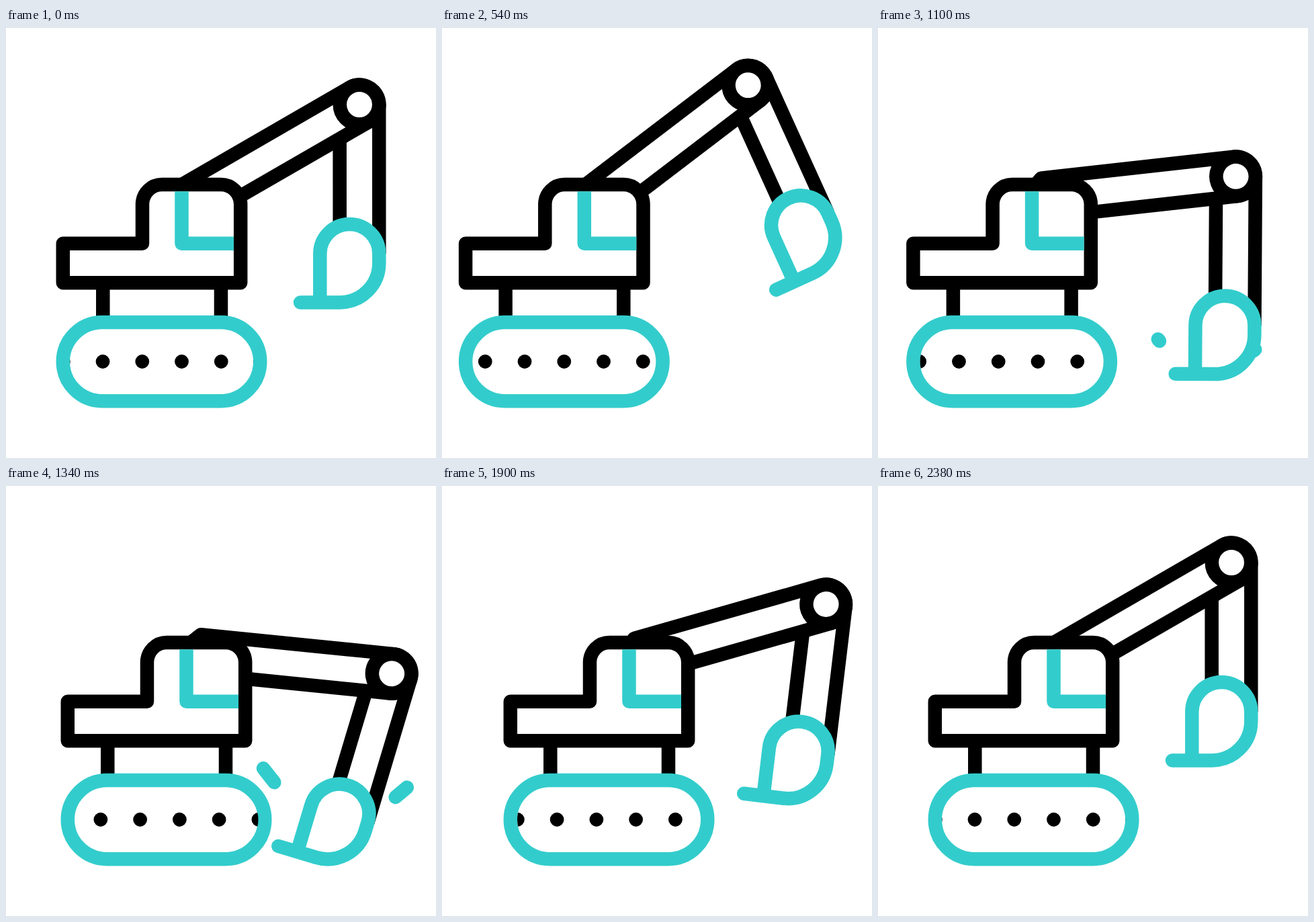
These frames come from a looping animation (640 px wide and 640 px high, 2400 ms). An HTML page:

```html
<!DOCTYPE html>
<html lang="en">
<head>
<meta charset="utf-8">
<title>Excavator</title>
<style>
  html, body { margin: 0; width: 100%; height: 100%; overflow: hidden; background: #fff; }
  svg { display: block; width: 100%; height: 100%; }
  .line { fill: #fff; stroke: #000; stroke-width: 20.5; stroke-linejoin: round; }
  .open { fill: none; }
  .teal { stroke: #3cc; }
  .round { stroke-linecap: round; }
</style>
</head>
<body>
<svg viewBox="0 0 640 640">
  <clipPath id="tread"><rect x="95" y="448" width="273.5" height="97.2" rx="48.6"/></clipPath>
  <g id="dust" class="line teal round">
    <path pathLength="1" d="M419 466L380 416.5"/>
    <path pathLength="1" d="M559 480.5L600 446"/>
  </g>
  <g id="machine">
    <g id="boom">
      <g id="stick">
        <path class="line open" d="M496.7 114V310M555.3 114V336"/>
        <path class="line teal round" d="M467.3 408.4V336A44 44 0 0 1 555.3 336V350A58.4 58.4 0 0 1 496.9 408.4H438"/>
      </g>
      <path class="line" d="M319.8 266.9L540.7 139.4A29.3 29.3 0 0 0 511.4 88.6L261.5 233L250.5 271.5"/>
      <circle class="line" cx="526" cy="114" r="29.2"/>
    </g>
    <path class="line" d="M144.3 380V438M320 380V438"/>
    <rect class="line teal" x="84.8" y="438" width="293.5" height="117.2" rx="58.6"/>
    <g clip-path="url(#tread)"><g id="dots"></g></g>
    <path class="line" d="M84.8 379.3V320.8H203V262A29.3 29.3 0 0 1 232.3 233.1H320A29.3 29.3 0 0 1 349.2 262V379.3Z"/>
    <path class="line open teal" d="M261.5 243.3V320.8H339"/>
  </g>
</svg>
<script>
const LOOP = 2400;
const DOT_GAP = 58.75;
const $ = id => document.getElementById(id);
const smooth = s => s * s * (3 - 2 * s);

// Eased move from a to b between times t0 and t1; soft = 0 is linear, 1 fully eased
function ease(t, t0, t1, a, b, soft = 1) {
  const s = Math.min(1, Math.max(0, (t - t0) / (t1 - t0)));
  return a + (b - a) * (s + (smooth(s) - s) * soft);
}

// Swing from rest to one extreme, on to the other, and back to rest
function swing(t, t1, low, t2, high) {
  if (t < t1) return ease(t, -8, t1, 0, low);
  if (t < t2) return ease(t, t1, t2, low, high);
  return ease(t, t2, 2370, high, 0);
}

// Fold out, then drift back more evenly
function fold(t, peak, angle) {
  return t < peak ? ease(t, -8, peak, 0, angle) : ease(t, peak, 2380, angle, 0, .5);
}

for (let i = -4; i < 9; i++) {
  const dot = document.createElementNS("http://www.w3.org/2000/svg", "circle");
  dot.setAttribute("cx", 144 + i * DOT_GAP);
  dot.setAttribute("cy", 496.5);
  dot.setAttribute("r", 10.4);
  $("dots").append(dot);
}

function draw(t) {
  const move = (id, transform) => $(id).setAttribute("transform", transform);
  move("machine", `translate(${swing(t, 784, -64.1, 1580, 26.6)} 0)`);
  move("boom", `rotate(${swing(t, 780, -9.4, 1270, 36.2)} 290.5 260.4)`);
  move("stick", `rotate(${fold(t, 892, -25.8)} 526 114)`);
  move("dots", `translate(${swing(t, 815, 118, 1650, -67.5)} 0)`);

  // Each spark stretches out, then its tail catches up
  const head = ease(t, 1050, 1400, 0, 1), tail = ease(t, 1090, 1590, 0, .999);
  const dust = $("dust");
  dust.setAttribute("visibility", t >= 1060 && t < 1600 ? "visible" : "hidden");
  dust.setAttribute("stroke-dasharray", `${head - tail} 2`);
  dust.setAttribute("stroke-dashoffset", -tail);
}

const start = performance.now();
function tick() {
  draw((performance.now() - start) % LOOP);
  requestAnimationFrame(tick);
}
draw(0);
requestAnimationFrame(tick);
</script>
</body>
</html>
```
